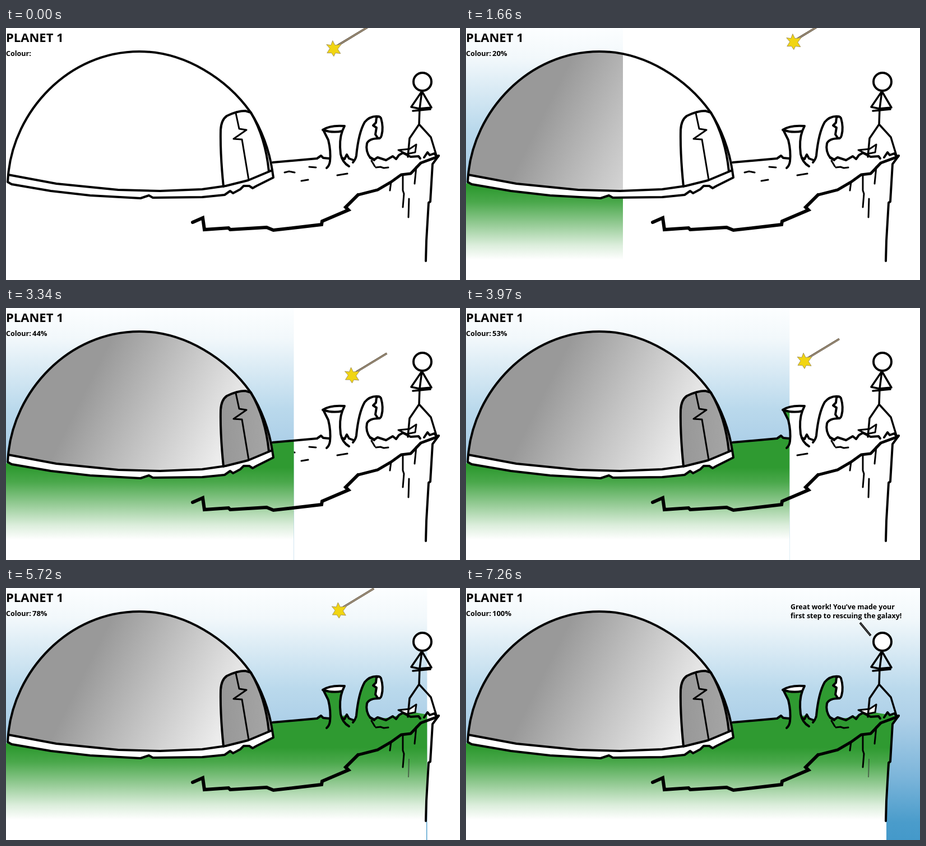
Animation of 810x450 px, one loop 8000 ms. Source, as an HTML page without scripts:

```html
<!DOCTYPE html>
<html lang="en">
<head>
<meta charset="utf-8">
<title>Planet 1</title>
<style>
  /* --p is the progress in percent; everything else follows from it */
  @property --p { syntax: "<integer>"; inherits: true; initial-value: 0; }

  @keyframes progress {
    0% { --p: 0; animation-timing-function: step-end; }
    4.125% { --p: 1; animation-timing-function: steps(99, jump-end); }
    90.75%, 100% { --p: 100; }
  }

  html, body { margin: 0; width: 100%; height: 100%; overflow: hidden; background: #fff; }
  #stage {
    position: relative; width: 810px; height: 450px; overflow: hidden;
    font: bold 12.5px "Open Sans", "Noto Sans", sans-serif;
    animation: progress 8s infinite;
  }
  svg { position: absolute; left: 0; top: 0; }
  text { fill: #000; }

  #percent {
    position: absolute; left: 47px; top: 36px;
    font-size: 13px; line-height: 18px; opacity: var(--p);
  }
  #percent::after { counter-reset: n var(--p); content: counter(n) "%"; }

  #wipe {
    width: calc(1px * min(14 * var(--p), 202 + 7.08 * var(--p), 320 + 5.53 * var(--p)));
  }

  /* the wand swings round a narrow loop, ten steps a turn */
  #wand {
    --a: calc(36deg * var(--p));
    --b: calc(72deg * var(--p));
    --x: calc(603.8 - 21.9 * cos(var(--a)) - 2 * sin(var(--a)) + 2.9 * cos(var(--b)) + 3.9 * sin(var(--b)));
    --y: calc(73.4 - 53.2 * cos(var(--a)) + 11.3 * sin(var(--a)) + 4.4 * cos(var(--b)) + 4.6 * sin(var(--b)) + max(0, 12 - 12 * var(--p)));
    transform: translate(calc(1px * var(--x)), calc(1px * var(--y)));
    opacity: calc(96 - var(--p));
  }
  #speech { font-size: 12.4px; opacity: calc(var(--p) - 99); }

  .ink { fill: none; stroke: #000; stroke-width: 4; stroke-linejoin: round; stroke-linecap: round; }
  .thin { stroke-width: 3; }
  .thick { stroke-width: 6; stroke-linejoin: miter; }
  .white { fill: #fff; }
</style>
</head>
<body>
<div id="stage">
<svg width="810" height="450" viewBox="0 0 810 450">
  <defs>
    <linearGradient id="sky" x1="0" y1="0" x2="0" y2="1">
      <stop offset="0" stop-color="#fcfeff"/>
      <stop offset=".12" stop-color="#f2f8fb"/>
      <stop offset=".4" stop-color="#bad9ec"/>
      <stop offset=".52" stop-color="#aed0e8"/>
      <stop offset=".75" stop-color="#7cb5da"/>
      <stop offset=".93" stop-color="#4a9ccb"/>
      <stop offset="1" stop-color="#4499ca"/>
    </linearGradient>
    <linearGradient id="grass" gradientUnits="userSpaceOnUse" x1="0" y1="285" x2="0" y2="414">
      <stop offset="0" stop-color="#2f9a31"/>
      <stop offset=".2" stop-color="#4aa84b"/>
      <stop offset=".5" stop-color="#93ca93"/>
      <stop offset=".8" stop-color="#dceedc"/>
      <stop offset="1" stop-color="#fff"/>
    </linearGradient>
    <linearGradient id="metal" gradientUnits="userSpaceOnUse" x1="150" y1="130" x2="400" y2="255">
      <stop offset="0" stop-color="#999"/>
      <stop offset=".5" stop-color="#c6c6c6"/>
      <stop offset="1" stop-color="#f0f0f0"/>
    </linearGradient>
    <linearGradient id="steel">
      <stop offset="0" stop-color="#979797"/>
      <stop offset="1" stop-color="#a6a6a6"/>
    </linearGradient>
    <clipPath id="shown"><rect id="wipe" height="450"/></clipPath>

    <path id="dome" d="M4 262C14 150 110 42 238 42C320 42 395 92 436 150C456 180 470 220 475 254"/>
    <path id="door" d="M388 283Q382 225 383 182Q384 164 394 157Q412 148 427 148L437 151Q463 196 469 256"/>
    <path id="pot" d="M567 184L575 200Q580 220 578 238Q577 246 572 250M600 184Q594 200 597 225Q600 240 612 247"/>
    <path id="pipe" d="M619 240Q624 234 625 228Q629 187 640 168Q650 156 665 158M666 197Q648 197 644 206Q641 220 650 232L657 236"/>
  </defs>

  <!-- marks that the colour paints over -->
  <path class="ink thin" d="M497 258L505 256L515 258M527 273L539 271M541 248L553 249M591 263L609 260M719 305L718 338"/>

  <g clip-path="url(#shown)">
    <rect width="810" height="450" fill="url(#sky)"/>
    <path fill="url(#grass)" d="M0 278L10 268L476 240L555 233L562 229L577 233L607 227L612 235L657 234L690 231L716 220L740 224L772 229L761 243L757 310L750 380V450H0Z"/>
    <path fill="#2f9a31" d="M567 184L575 200Q580 220 578 240H600Q594 205 600 184ZM625 238Q629 187 640 168Q650 156 665 158V197Q648 197 644 206Q641 220 650 236Z"/>
    <path fill="url(#metal)" d="M4 262C14 150 110 42 238 42C320 42 395 92 436 150C456 180 470 220 475 254Q400 292 275 291Q130 288 4 262Z"/>
    <path fill="url(#steel)" d="M388 283Q382 225 383 182Q384 164 394 157Q412 148 427 148L437 151Q463 196 474 254Q435 274 388 283Z"/>
    <path d="M719 305L718 338" stroke="#333" stroke-opacity=".6" stroke-width="2"/>
  </g>

  <!-- dome -->
  <path class="ink white" d="M4 262L90 278L200 289L275 291L350 288L392 282L432 272L475 254L477 267L447 282L440 286L434 282L424 282L418 288L405 295L400 291L390 298L350 302L262 303L255 299L240 304L150 299L80 291L10 279L3 275Z"/>
  <use href="#dome" class="ink"/>
  <use href="#door" class="ink"/>
  <path class="ink thin" d="M410 152L416 180L429 182L406 198L421 199L433 271"/>

  <!-- pipes -->
  <use href="#pot" class="ink"/>
  <path class="ink white" d="M565 182Q578 173 604 175L600 184Q583 188 565 182Z"/>
  <use href="#pipe" class="ink"/>
  <path class="ink white" d="M661 160Q666 156 669 161Q674 178 670 192Q668 199 663 196L659 190L661 178L655 174L660 169Z"/>

  <!-- ground and cliff -->
  <path class="ink" d="M476 240L555 233L562 228L566 232L577 233M600 232L604 234L608 226L612 233L620 236M650 231L657 235L663 231L678 236L690 229L696 234L701 227L708 223L722 230L736 229L739 233M746 231L752 222L756 227L764 224L768 229L772 228"/>
  <path class="ink thin white" d="M700 218L720 216L732 208L730 222L715 225Z"/>
  <path class="ink thick" d="M333 347L351 339L354 360L397 357L400 360L465 356L477 361L563 351L564 345L611 325L606 320L628 298"/>
  <path class="ink" style="stroke-width:5" d="M628 298L663 289L687 275L705 262L722 260L740 241L770 230"/>
  <path class="ink" d="M772 228L761 243L757 310L754 312L750 380L749 416"/>
  <path class="ink thin" d="M687 275L685 290M708 262L708 290L710 296L708 320M732 248L729 278M652 237L658 247M660 249L668 248L674 250L682 249"/>

  <!-- figure -->
  <circle class="ink white" cx="743" cy="96" r="16"/>
  <path class="ink" style="stroke-width:3.5" d="M742 113L723 141L737 144L759 142L742 113L738 144L737 172L720 197L717 230M726 148L757 145M737 172L758 195L768 228"/>

  <g id="wand">
    <path d="M6 -5L62 -39" stroke="#5f523f" stroke-width="3.6"/>
    <path d="M6 -5L62 -39" stroke="#a99a84" stroke-width="1.6"/>
    <path d="M-2 -14L2 -6L13 -7L7 1L12 9L3 8L0 14L-4 8L-12 8L-7 0L-13 -7L-5 -6Z" fill="#f1d512" stroke="#a8975a" stroke-width="1"/>
  </g>

  <text x="0" y="25" font-size="22">PLANET 1</text>
  <text x="0" y="49.500">Colour:</text>
  <g id="speech">
    <text x="579" y="38">Great work! You’ve made your</text>
    <text x="579" y="54">first step to rescuing the galaxy!</text>
    <path d="M703 62L722 85" stroke="#000" stroke-width="3.6"/>
    <path d="M703.500 62.500L721.500 84.500" stroke="#999" stroke-width="1"/>
  </g>
</svg>
<div id="percent"></div>
</div>
</body>
</html>
```
